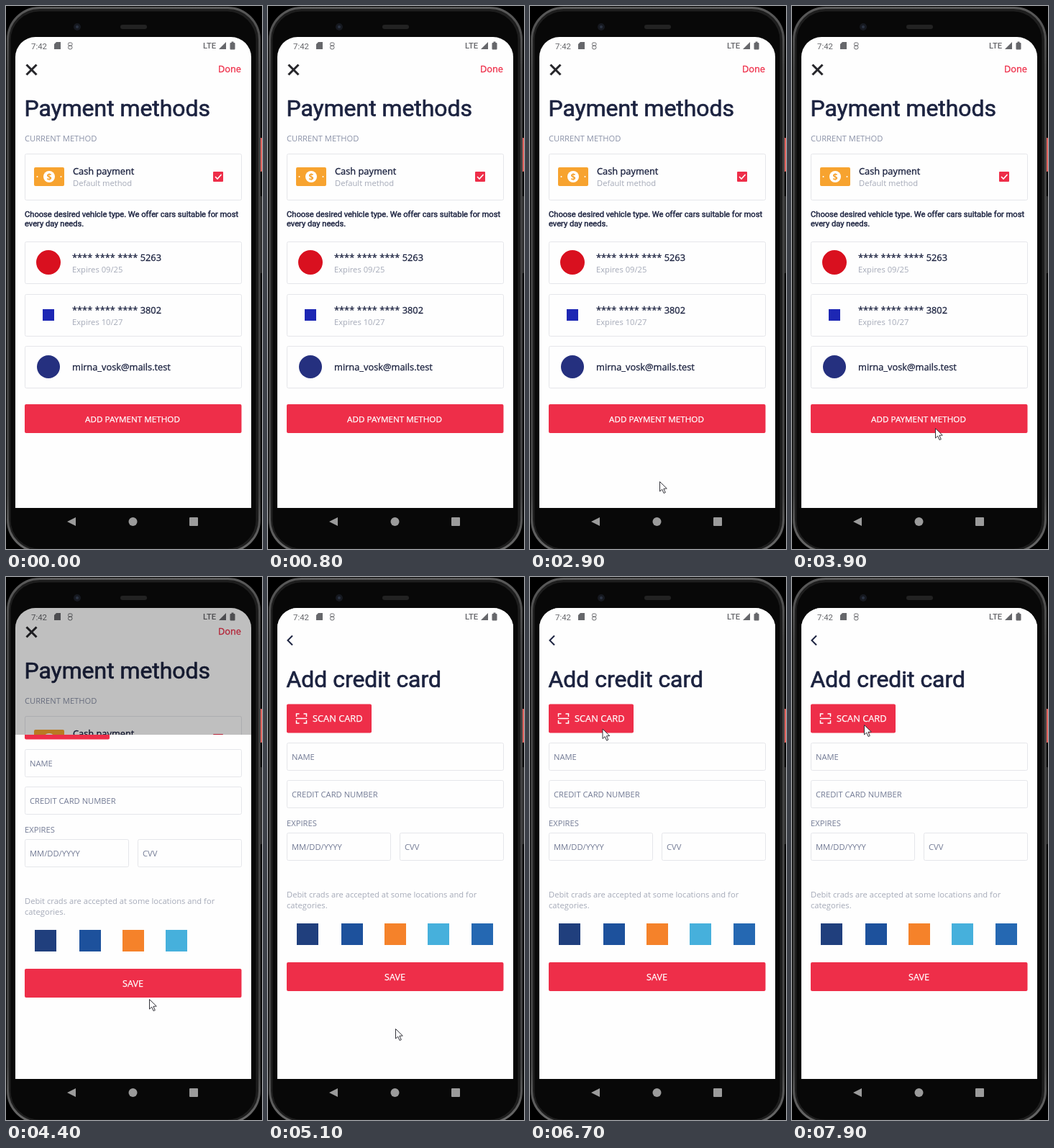
Recreate the animation shown at these times as an HTML page with a canvas. Size 356 by 754 pixels, loop 8000 ms.

```html
<!DOCTYPE html>
<html lang="en">
<head>
<meta charset="utf-8">
<title>Payment methods</title>
<style>
html, body { margin: 0; width: 100%; height: 100%; overflow: hidden; background: #000; }
canvas { display: block; }
</style>
</head>
<body>
<canvas id="stage" width="356" height="754"></canvas>
<script>
const ctx = document.getElementById('stage').getContext('2d');
const LOOP = 8000, STEP = 100;
const RED = '#ee2e49', INK = '#1c2340', MUTED = '#737b95', PALE = '#a5aab8', LINE = '#e5e6ea';
const SCREEN = { x: 13, y: 43, w: 328, h: 654, bottom: 697 };
const SANS = '"Open Sans", sans-serif', ROBOTO = 'Roboto, sans-serif';

// Pointer path: time, x, y
const POINTER = [
  [900, 135, 756], [1400, 118, 610], [1800, 111, 574], [2300, 116, 580],
  [2900, 180, 660], [3600, 244, 738], [3700, 238, 690], [3800, 214, 618],
  [3900, 199, 586], [4900, 199, 586], [5100, 177, 627], [5300, 165, 612],
  [5900, 100, 242], [6500, 101, 216], [6900, 100, 205], [8000, 100, 205]
];

function text(str, x, y, size, color, { font = SANS, weight = 400, bold = 0, align = 'left' } = {}) {
  ctx.font = `${weight} ${size}px ${font}`;
  ctx.textAlign = align;
  ctx.fillStyle = color;
  ctx.fillText(str, x, y);
  if (bold) {
    ctx.strokeStyle = color;
    ctx.lineWidth = bold;
    ctx.lineJoin = 'round';
    ctx.strokeText(str, x, y);
  }
}

function rect(x, y, w, h, color, r = 0) {
  ctx.fillStyle = color;
  ctx.beginPath();
  ctx.roundRect(x, y, w, h, r);
  ctx.fill();
}

function outline(x, y, w, h, color = LINE, r = 2, width = 1) {
  ctx.strokeStyle = color;
  ctx.lineWidth = width;
  ctx.beginPath();
  ctx.roundRect(x + 0.5, y + 0.5, w, h, r);
  ctx.stroke();
}

function disc(x, y, r, color) {
  ctx.fillStyle = color;
  ctx.beginPath();
  ctx.arc(x, y, r, 0, Math.PI * 2);
  ctx.fill();
}

function trace(points, close) {
  ctx.beginPath();
  points.forEach(([x, y]) => ctx.lineTo(x, y));
  if (close) ctx.closePath();
}

function shape(points, color) {
  trace(points, true);
  ctx.fillStyle = color;
  ctx.fill();
}

function line(points, color, width) {
  trace(points);
  ctx.strokeStyle = color;
  ctx.lineWidth = width;
  ctx.lineJoin = 'miter';
  ctx.stroke();
}

function button(label, x, y, w, size, labelX, align) {
  rect(x, y, w, 40, RED, 2);
  text(label, labelX, y + 24.5, size, '#fff', { align, bold: 0.25 });
}

function field(label, x, y, w) {
  outline(x, y, w, 38);
  text(label, x + 7, y + 24, 11.2, MUTED);
}

function phone() {
  rect(0, 0, 356, 754, '#000');
  rect(352, 183, 4, 47, '#e2645f', 1);
  rect(353, 264, 3, 107, '#2a2a2a', 1);
  const edge = ctx.createLinearGradient(0, 0, 0, 754);
  edge.addColorStop(0, '#5a5a5a');
  edge.addColorStop(0.12, '#424242');
  edge.addColorStop(0.9, '#424242');
  edge.addColorStop(1, '#686868');
  rect(1, 2, 352, 757, '#080808', 45);
  outline(4, 5, 345, 750, '#1e1e1e', 42, 4);
  outline(2, 2, 350, 755, edge, 44, 3);
  rect(159, 26, 37, 6, '#222', 3);
  disc(99, 29, 5, '#161920');
  disc(99, 29, 2, '#2b3342');
}

function navBar() {
  const gray = '#9b9b9b';
  shape([[85, 716], [97, 710], [97, 722]], gray);
  disc(176.5, 716, 6, gray);
  rect(255, 710, 12, 12, gray, 1);
}

function statusBar() {
  const gray = '#66676b';
  text('7:42', 35, 60, 11.4, gray, { font: ROBOTO });
  shape([[70, 50], [76, 50], [76, 60], [67, 60], [67, 53]], gray);
  outline(86, 50.5, 5.5, 4, gray, 1.5);
  outline(86, 54.5, 5.5, 5, gray, 2.5);
  text('LTE', 274, 59, 11.2, gray, { font: ROBOTO, weight: 500 });
  shape([[306, 50], [306, 60], [296, 60]], gray);
  rect(311.5, 51, 7, 9.5, gray, 1);
  rect(313.5, 49.5, 3, 2, gray);
}

function cashIcon() {
  rect(39, 224, 42, 26, '#f7a32f', 2);
  disc(60, 237, 8, '#fff');
  text('$', 60, 241.5, 12.5, '#f7a32f', { align: 'center', weight: 700 });
  disc(43.5, 237, 1, '#fff');
  disc(76.5, 237, 1, '#fff');
}

function savedCard(y, digits, expiry) {
  outline(26, y, 301, 58);
  text('**** **** **** ' + digits, 92, y + 27, 12.8, INK, { bold: 0.3 });
  text('Expires ' + expiry, 92, y + 43, 11.2, PALE);
}

function heading(str) {
  text(str, 25.5, 153, 31.9, INK, { font: ROBOTO, bold: 0.7 });
}

function methodsPage() {
  rect(SCREEN.x, SCREEN.y, SCREEN.w, SCREEN.h + 20, '#fefefe');
  line([[28.5, 81.5], [42.5, 95.5]], '#26262a', 3);
  line([[42.5, 81.5], [28.5, 95.5]], '#26262a', 3);
  text('Done', 327, 92, 12.8, RED, { align: 'right', bold: 0.3 });
  heading('Payment methods');
  text('CURRENT METHOD', 26, 188, 11.2, '#8b92a8');

  outline(26, 205, 301, 64);
  cashIcon();
  text('Cash payment', 93, 234, 12.8, INK, { bold: 0.35 });
  text('Default method', 93, 250, 11.2, PALE);
  rect(288, 230, 14, 14, RED, 1);
  line([[291, 237], [294, 240], [299.5, 234]], '#fff', 1.6);

  const note = { font: ROBOTO, bold: 0.45 };
  text('Choose desired vehicle type. We offer cars suitable for most', 26, 293, 11.15, INK, note);
  text('every day needs.', 26, 305.5, 11.15, INK, note);

  savedCard(327, '5263', '09/25');
  disc(59, 356, 17, '#d9101f');
  savedCard(400, '3802', '10/27');
  rect(51, 421, 16, 16, '#1d27b4');
  outline(26, 472, 301, 58);
  disc(59, 501, 16, '#25307f');
  text('mirna_vosk@mails.test', 92, 506, 12.8, INK, { bold: 0.3 });
  button('ADD PAYMENT METHOD', 26, 553, 301.5, 11.65, 176, 'center');
}

function scanIcon() {
  for (const [cx, dx] of [[39.5, 1], [53.5, -1]]) {
    for (const [cy, dy] of [[190, 1], [203, -1]]) {
      line([[cx + 4 * dx, cy], [cx, cy], [cx, cy + 4 * dy]], '#fff', 1.5);
    }
  }
  line([[39, 196.5], [54, 196.5]], '#fff', 1.5);
}

function cardPage(allBadges) {
  rect(SCREEN.x, SCREEN.y, SCREEN.w, SCREEN.h, '#fefefe');
  line([[34, 81.5], [27.5, 88], [34, 94.5]], INK, 2);
  heading('Add credit card');
  button('SCAN CARD', 26, 176.5, 118, 12.8, 62, 'left');
  scanIcon();
  field('NAME', 26, 230, 301);
  field('CREDIT CARD NUMBER', 26, 282, 301);
  text('EXPIRES', 26, 346, 11.2, MUTED);
  field('MM/DD/YYYY', 26, 355, 144);
  field('CVV', 183, 355, 144);
  text('Debit crads are accepted at some locations and for', 26, 445, 11.2, PALE);
  text('categories.', 26, 460, 11.2, PALE);

  const badges = [[55, '#203f7d'], [117, '#1d519c'], [177, '#f5822a'], [237, '#46b0dc'], [298, '#2568b2']];
  badges.slice(0, allBadges ? 5 : 4).forEach(([x, color]) => rect(x - 15, 481, 30, 30, color));
  button('SAVE', 26, 535, 301.5, 12.6, 176.5, 'center');
}

function pointer(t) {
  const next = POINTER.findIndex(p => p[0] > t);
  if (next < 1) return;
  const [t0, x0, y0] = POINTER[next - 1], [t1, x1, y1] = POINTER[next];
  const k = (t - t0) / (t1 - t0);
  ctx.save();
  ctx.translate(x0 + (x1 - x0) * k + 0.5, y0 + (y1 - y0) * k + 0.5);
  trace([[0, 0], [0, 13.5], [3.2, 10.6], [5.6, 16], [7.8, 15], [5.4, 9.8], [9.8, 9.5]], true);
  ctx.fillStyle = '#fff';
  ctx.fill();
  ctx.strokeStyle = '#33333a';
  ctx.lineWidth = 1;
  ctx.lineJoin = 'round';
  ctx.stroke();
  ctx.restore();
}

function revealAt(t) {
  const p = 1 - Math.exp(-Math.max(0, t - 4270) / 100);
  return p > 0.985 ? 1 : p;
}

function draw(t) {
  const reveal = revealAt(t);
  const leaving = Math.min(1, reveal * 1.4);
  phone();
  ctx.save();
  ctx.beginPath();
  ctx.roundRect(SCREEN.x, SCREEN.y, SCREEN.w, SCREEN.h, [28, 28, 0, 0]);
  ctx.clip();

  if (reveal < 1) {
    ctx.save();
    ctx.translate(0, -12 * leaving);
    methodsPage();
    ctx.restore();
    statusBar();
    rect(SCREEN.x, SCREEN.y, SCREEN.w, SCREEN.h, `rgba(0,0,0,${0.25 * leaving})`);
  }
  if (reveal > 0) {
    const top = Math.round(SCREEN.bottom - 657 * reveal);
    ctx.save();
    ctx.beginPath();
    ctx.rect(SCREEN.x, top, SCREEN.w, SCREEN.bottom - top);
    ctx.clip();
    rect(SCREEN.x, SCREEN.y, SCREEN.w, SCREEN.h, '#fefefe');
    ctx.translate(0, Math.round(33 * (1 - reveal)));
    cardPage(t >= 4600);
    ctx.restore();
    if (reveal > 0.95) statusBar();
  }
  ctx.restore();
  navBar();
  pointer(t);
}

function tick(now) {
  draw(Math.floor((now % LOOP) / STEP) * STEP);
  requestAnimationFrame(tick);
}
draw(0);
requestAnimationFrame(tick);
</script>
</body>
</html>
```
